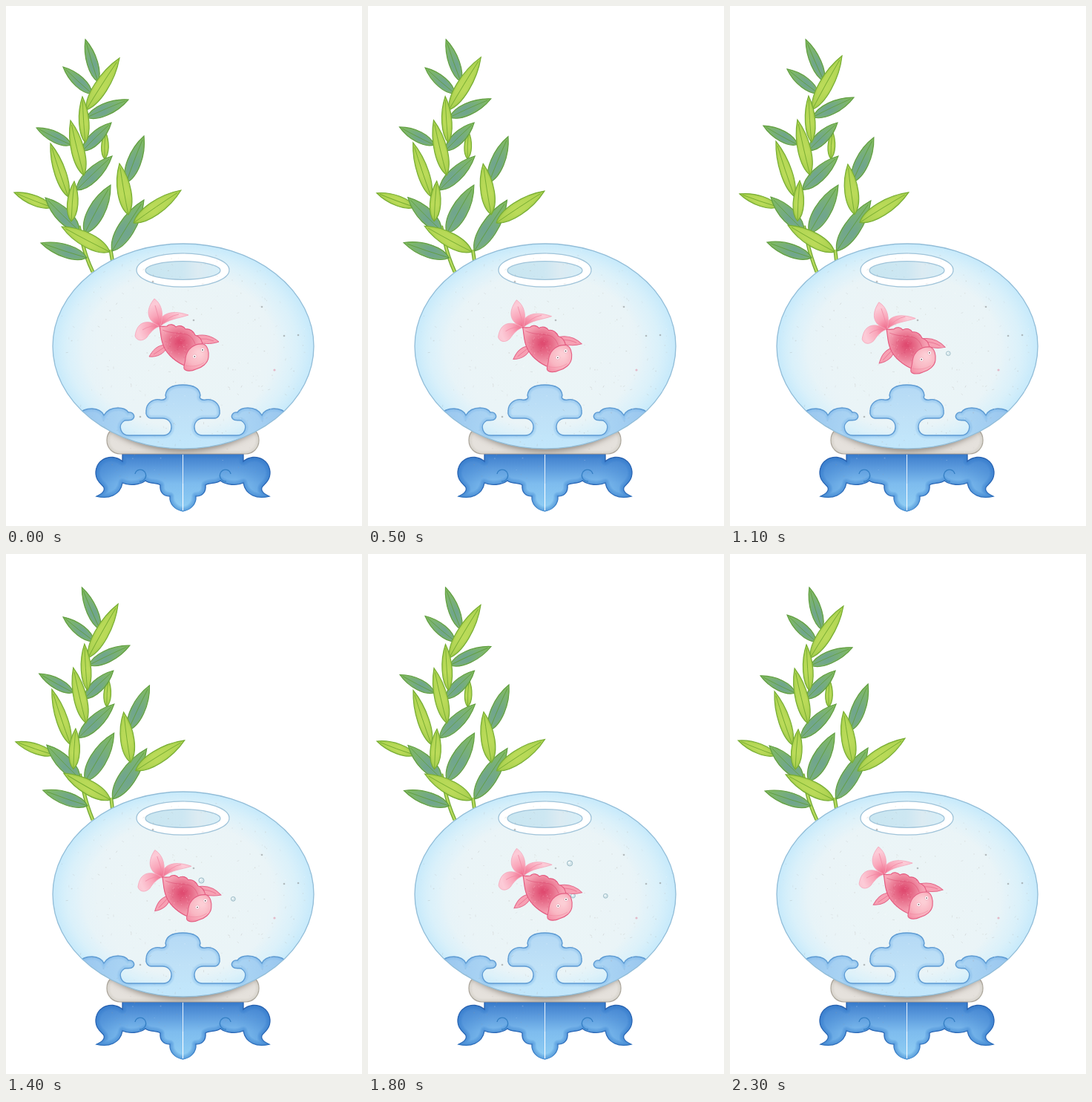
An HTML page with a canvas for the animation above (2.4 s loop, 480 px wide and 700 px high).

```html
<!DOCTYPE html>
<html lang="en">
<head>
<meta charset="utf-8">
<title>Goldfish bowl</title>
<style>
html, body { margin: 0; width: 100%; height: 100%; overflow: hidden; background: #fff; }
canvas { display: block; width: 480px; height: 700px; }
</style>
</head>
<body>
<canvas id="stage" width="480" height="700"></canvas>
<script>
const W = 480, H = 700, LOOP = 2400, STEP = 100, MID = 238.5;
const ctx = document.getElementById('stage').getContext('2d');

// Leaf rows: base x, y, tip x, y, tip shift x, y, width
const backLeaves = [
  [62, 271, 11, 251, 2, 2, 14],
  [133, 206, 134, 169, 4, -1, 10]
];
const darkLeaves = [
  [124, 102, 107, 45, -5, 0, 15],
  [116, 118, 77, 82, 0, 3, 15],
  [109, 150, 165, 126, 2, -3, 17],
  [88, 187, 41, 164, 4, -3, 15],
  [103, 195, 142, 157, 3, 0, 17],
  [95, 248, 143, 202, 3, 0, 19],
  [162, 238, 186, 175, 8, 2, 19],
  [99, 303, 53, 258, 2, -1, 20],
  [106, 306, 141, 241, 5, 0, 23],
  [143, 330, 186, 261, 4, 1, 23],
  [109, 339, 47, 319, 3, -1, 18]
];
const lightLeaves = [
  [108, 140, 153, 70, -2, -3, 19],
  [107, 184, 103, 122, 3, -1, 14],
  [105, 228, 87, 154, 4, -1, 18],
  [84, 257, 60, 185, 2, -3, 16],
  [88, 290, 92, 236, 2, -1, 15],
  [172, 292, 236, 248, 5, 3, 19],
  [165, 281, 153, 212, 6, 1, 19],
  [140, 331, 75, 297, 3, -2, 20]
];

function gradient(c, coords, stops) {
  const g = coords.length === 4
    ? c.createLinearGradient(...coords) : c.createRadialGradient(...coords);
  stops.forEach(([at, color]) => g.addColorStop(at, color));
  return g;
}

function paint(c, path, fill, stroke, width = 1.2) {
  if (fill) { c.fillStyle = fill; c.fill(path); }
  if (stroke) { c.strokeStyle = stroke; c.lineWidth = width; c.stroke(path); }
}

function oval(x, y, rx, ry = rx) {
  const p = new Path2D();
  p.ellipse(x, y, rx, ry, 0, 0, Math.PI * 2);
  return p;
}

// Soft inner shade along the outline
function innerShade(c, path, color, size) {
  c.save();
  c.clip(path);
  c.strokeStyle = color;
  c.lineJoin = 'round';
  for (let w = size; w > 0; w -= 2) { c.lineWidth = w; c.stroke(path); }
  c.restore();
}

function seeded(seed) {
  return () => (seed = (seed * 16807) % 2147483647) / 2147483647;
}

const bowl = oval(239, 458, 176, 138);
const mirror = new DOMMatrix([-1, 0, 0, 1, MID * 2, 0]);

function bothSides(d) {
  const half = new Path2D(d), p = new Path2D();
  p.addPath(half);
  p.addPath(half, mirror);
  return p;
}

function drawStand(c) {
  const legs = 'M239 603H157V613C150 607 139 605 130 611C121 617 119 629 123 637' +
    'C127 645 134 646 132 652C130 657 126 658 122 660C138 664 154 659 157 642' +
    'C166 646 180 645 188 639C194 644 203 641 208 645C207 654 212 660 221 660' +
    'C220 670 228 679 239 680';
  const shape = bothSides(legs);
  const blue = gradient(c, [0, 603, 0, 680],
    [[0, '#3c7ccb'], [.25, '#5c9bdd'], [.52, '#7ebcee'], [1, '#91cff4']]);
  paint(c, shape, blue);
  const side = gradient(c, [121, 0, 356, 0],
    [[0, '#3f82d099'], [.2, '#4b90d800'], [.8, '#4b90d800'], [1, '#3f82d099']]);
  paint(c, shape, side);
  innerShade(c, shape, '#2f76c81c', 12);
  paint(c, shape, null, gradient(c, [0, 603, 0, 680],
    [[0, '#265fae'], [.65, '#2b69b7'], [1, '#4a91d2']]), 1.3);
  paint(c, new Path2D('M239 603V643'), null, '#5b9adf22', 3);
  const curl = bothSides('M174 630C175 624 183 622 187 627C191 633 187 640 180 640');
  paint(c, curl, null, '#347fc4', 1.3);

  const plate = new Path2D();
  plate.roundRect(136, 566, 205, 37, 18);
  paint(c, plate, '#e5e1dc', '#aaa299', 1.2);
  innerShade(c, plate, '#b8aea211', 10);
  c.save();
  c.clip(plate);
  c.filter = 'blur(4px)';
  paint(c, oval(239, 462, 160, 138), '#8d847b');
  c.restore();
}

function drawClouds(c) {
  const half = 'M238.5 610H40V550H98C102 544 108 542 116 542C124 542 130 546 132 551' +
    'C136 544 143 541 151 541C160 541 163 544 165 547C171 546 175 552 171 556' +
    'C168 559 163 557 160 558C155 561 153 566 155 571C157 576 161 578 166 578' +
    'H212C219 578 223 573 223 567C223 560 218 555 211 555H196C191 555 188 550 189 545' +
    'C189 535 198 528 208 530C214 531 217 528 215 524C216 514 224 510 238.5 510';
  const shape = bothSides(half);
  const outline = bothSides(half.replace('M238.5 610H40V550H98', 'M98 550'));
  c.save();
  c.clip(bowl);
  paint(c, shape, gradient(c, [0, 510, 0, 596],
    [[0, '#b4d9f5'], [.5, '#bfe1f7'], [1, '#c2e7fb']]));
  paint(c, shape, gradient(c, [90, 0, 387, 0],
    [[0, '#8bbcebcc'], [.24, '#98c8f088'], [.36, '#b4d9f500'],
     [.64, '#b4d9f500'], [.76, '#98c8f088'], [1, '#8bbcebcc']]));
  paint(c, new Path2D('M60 574H420V600H60Z'), gradient(c, [0, 574, 0, 590],
    [[0, '#c2e6fb00'], [1, '#c2e6fbcc']]));
  c.save();
  c.clip(shape);
  for (let w = 9; w > 0; w -= 2) paint(c, outline, null, '#6eaee51c', w);
  c.restore();
  paint(c, outline, null, '#5e9bd3', 1.4);
  c.restore();
}

function drawSpecks(c) {
  const rnd = seeded(4711);
  const area = new Path2D(bowl);
  area.rect(140, 590, 198, 50);
  c.save();
  c.clip(area);
  for (let i = 0; i < 420; i++) {
    const x = 62 + rnd() * 354, y = 320 + rnd() * 325;
    c.globalAlpha = .08 + rnd() * .22;
    c.fillStyle = rnd() < .6 ? '#a49b91' : '#fff';
    c.fillRect(x, y, .6 + rnd() * 1.2, .6 + rnd() * 1.2);
  }
  c.lineWidth = .7;
  for (let i = 0; i < 60; i++) {
    const x = 75 + rnd() * 320, y = 340 + rnd() * 250, a = rnd() * 6.3;
    c.globalAlpha = .15 + rnd() * .2;
    c.strokeStyle = '#968f8c';
    c.beginPath();
    c.moveTo(x, y);
    c.lineTo(x + Math.cos(a) * 3, y + Math.sin(a) * 3);
    c.stroke();
  }
  c.globalAlpha = .55;
  for (const [x, y] of [[198, 371], [345, 405], [375, 444], [394, 443], [253, 423], [181, 553]])
    paint(c, oval(x, y, 1.3), '#8b8f91');
  paint(c, oval(362, 490, 1.6), '#e08ba5');
  c.restore();
}

function drawBowl(c) {
  paint(c, bowl, gradient(c, [239, 458, 0, 239, 458, 176],
    [[0, '#ecf5f6'], [.65, '#eaf4f7'], [1, '#e0f2fa']]));
  c.save();
  c.clip(bowl);
  c.translate(239, 458);
  c.scale(1, 138 / 176);
  paint(c, oval(0, 0, 177), gradient(c, [-4, 6, 130, 0, 0, 177],
    [[0, '#d4effb00'], [.5, '#d3effb88'], [1, '#c5e9fb']]));
  c.restore();
  drawClouds(c);
  paint(c, bowl, null, '#92bdd8', 1.3);

  paint(c, oval(MID, 355.5, 62.5, 22.7), '#fff', '#9fc3d9', 1.3);
  paint(c, oval(MID, 356, 50.5, 12.3), gradient(c, [188, 0, 289, 0],
    [[0, '#c9e6f1'], [.5, '#cde7f2'], [.7, '#dcebf2'], [1, '#d5eef8']]), '#9fc3d9', 1.2);
}

function drawLeaf([bx, by, tx, ty, dx, dy, w], k, dark) {
  const lift = by < 300 ? 1 : .3;
  const sx = bx + k * 3 * lift, sy = by - k * lift * .5;
  const ex = tx + dx * k - sx, ey = ty + dy * k - sy;
  const len = Math.hypot(ex, ey), h = w * .64;
  const leaf = new Path2D(
    `M0 0C${len * .18} ${-h} ${len * .65} ${-h} ${len} 0C${len * .65} ${h} ${len * .18} ${h} 0 0Z`);
  ctx.save();
  ctx.translate(sx, sy);
  ctx.rotate(Math.atan2(ey, ex));
  const fill = dark
    ? gradient(ctx, [0, 0, len, 0], [[0, '#78ad82'], [.4, '#70a58e'], [1, '#82bc61']])
    : gradient(ctx, [0, 0, len, 0], [[0, '#a9cf50'], [.4, '#bbdb59'], [1, '#b0d553']]);
  paint(ctx, leaf, fill);
  const edge = dark ? '#629f42' : '#77ad32';
  innerShade(ctx, leaf, dark ? '#80bb5530' : '#82b83b18', 5);
  paint(ctx, leaf, null, edge, 1.2);
  paint(ctx, new Path2D(`M0 0Q${len * .5} -1 ${len * .92} 0`), null, edge, .9);
  ctx.restore();
}

function drawPlant(k) {
  const s = k * 1.5;
  const stems = [
    `M117 358Q${107 + s} 337 ${103 + s} 318L${98 + s} 296`,
    `M143.5 343L${141 + s * .5} 328`
  ];
  for (const d of stems) {
    const p = new Path2D(d);
    paint(ctx, p, null, '#6da52f', 5);
    paint(ctx, p, null, '#b6d95c', 2.6);
  }
  backLeaves.forEach(l => drawLeaf(l, k, false));
  darkLeaves.forEach(l => drawLeaf(l, k, true));
  lightLeaves.forEach(l => drawLeaf(l, k, false));
}

// One fish part, turned about its joint
function part(d, x, y, deg, fill, stroke, width = 1) {
  ctx.save();
  ctx.translate(x, y);
  ctx.rotate(deg * Math.PI / 180);
  ctx.translate(-x, -y);
  const p = new Path2D(d);
  paint(ctx, p, fill, stroke, width);
  ctx.restore();
}

function drawFish(k) {
  ctx.save();
  ctx.translate(4 * k, 4 * k);
  const tail = gradient(ctx, [208, 431, 2, 208, 431, 40],
    [[0, '#f06c8c'], [.35, '#f9a5b9'], [.75, '#fccbd7'], [1, '#fcc3d1']]);
  const fin = '#f7a0b3', line = '#e4688a', pale = '#f5a5ba';
  part('M208 431C204 417 220 407 246 416C231 421 220 421 208 431Z', 208, 431, k, tail, pale, .8);
  part('M208 431C192 422 177 423 174 444C176 451 184 452 190 446C194 440 200 433 208 431Z',
    208, 431, -k, tail, pale, .8);
  part('M208 431C190 425 187 410 200 394C211 402 213 417 208 431Z', 208, 431, -5 * k, tail, pale, .8);
  part('M208 431Q205 415 201 403M208 431Q195 429 184 436M208 431Q219 417 233 415',
    208, 431, -2 * k, null, '#f08aa5', .8);

  part('M216 456C203 456 197 465 193 472C204 473 213 468 217 460Z', 216, 457, -14 * k, fin, line);
  part('M214 459L199 469', 216, 457, -14 * k, null, line, .7);
  part('M256 444C268 441 279 445 287 452C275 456 265 455 256 451Z', 258, 447, 7 * k, fin, line);
  part('M260 448Q271 447 280 451', 258, 447, 7 * k, null, line, .7);

  const body = new Path2D('M207 431C212 432 214 431 217 431C221 427 227 429 229 432' +
    'C234 429 240 431 242 435C248 434 253 438 255 443C262 445 264 450 265 455' +
    'L243 485C230 480 218 470 213 459C208 449 209 439 207 431Z');
  paint(ctx, body, gradient(ctx, [234, 452, 2, 234, 455, 31],
    [[0, '#df4b70'], [.4, '#e8708c'], [.75, '#f297ab'], [1, '#f8b1bf']]));
  innerShade(ctx, body, '#f58ba325', 6);
  paint(ctx, body, null, '#e2587d', 1.1);
  paint(ctx, new Path2D('M211 436C222 441 234 440 243 442C250 444 253 450 255 455'),
    null, '#d9446b88', .9);
  const rnd = seeded(73);
  ctx.save();
  ctx.clip(body);
  for (let i = 0; i < 70; i++) {
    const x = 214 + rnd() * 38, y = 438 + rnd() * 38;
    ctx.fillStyle = i % 2 ? '#c9345d33' : '#ffd2dc44';
    ctx.fillRect(x, y, 1.2, 1.2);
  }
  ctx.restore();

  const head = new Path2D('M242 474C244 461 254 454 266 455C272 457 274 466 273 473' +
    'C272 481 264 487 256 489C250 492 242 492 240 488C239 484 242 480 242 474Z');
  paint(ctx, head, gradient(ctx, [261, 467, 3, 256, 472, 23],
    [[0, '#fcced5'], [.55, '#f9b6c2'], [1, '#f48aa3']]), '#e45e82', 1.1);
  paint(ctx, new Path2D('M242 484C250 486 260 485 267 480'), null, '#ee7f9a88', .9);
  for (const [x, y] of [[265, 463], [254.3, 471.8]]) {
    paint(ctx, oval(x, y, 2.7), '#fff', '#ee9bae', .6);
    paint(ctx, oval(x, y, .9), '#6f4e58');
  }
  ctx.restore();
}

// Bubble rows: start, end, x, y, dx, dy, radius; motion slows as it goes
const bubbles = [
  [1000, 2200, 290, 469, 42, -12, 2.9],
  [1300, 2200, 261, 446, 18, -48, 3.6],
  [1700, 2300, 274, 464, 12, -20, 3]
];

function drawBubbles(t) {
  for (const [from, to, x, y, dx, dy, r] of bubbles) {
    if (t < from || t >= to) continue;
    const u = (t - from) / (to - from), e = u * (1.25 - .25 * u);
    const bx = x + dx * e, by = y + dy * e;
    ctx.globalAlpha = Math.min(1, .5 + u * 4, (1 - u) * 4);
    paint(ctx, oval(bx, by, r), '#d4e6eb', '#9dbbc6', 1);
    paint(ctx, oval(bx - r * .25, by - r * .25, r * .4), '#f5fbfc');
    ctx.globalAlpha = 1;
  }
}

const scene = document.createElement('canvas');
scene.width = W;
scene.height = H;
const still = scene.getContext('2d');
drawStand(still);
drawBowl(still);
drawSpecks(still);

const start = performance.now();
function frame() {
  const t = Math.floor((performance.now() - start) % LOOP / STEP) * STEP;
  const k = (1 - Math.cos(t / LOOP * Math.PI * 2)) / 2;
  ctx.fillStyle = '#fff';
  ctx.fillRect(0, 0, W, H);
  drawPlant(k);
  ctx.drawImage(scene, 0, 0);
  drawBubbles(t);
  drawFish(k);
  requestAnimationFrame(frame);
}
frame();
</script>
</body>
</html>
```
